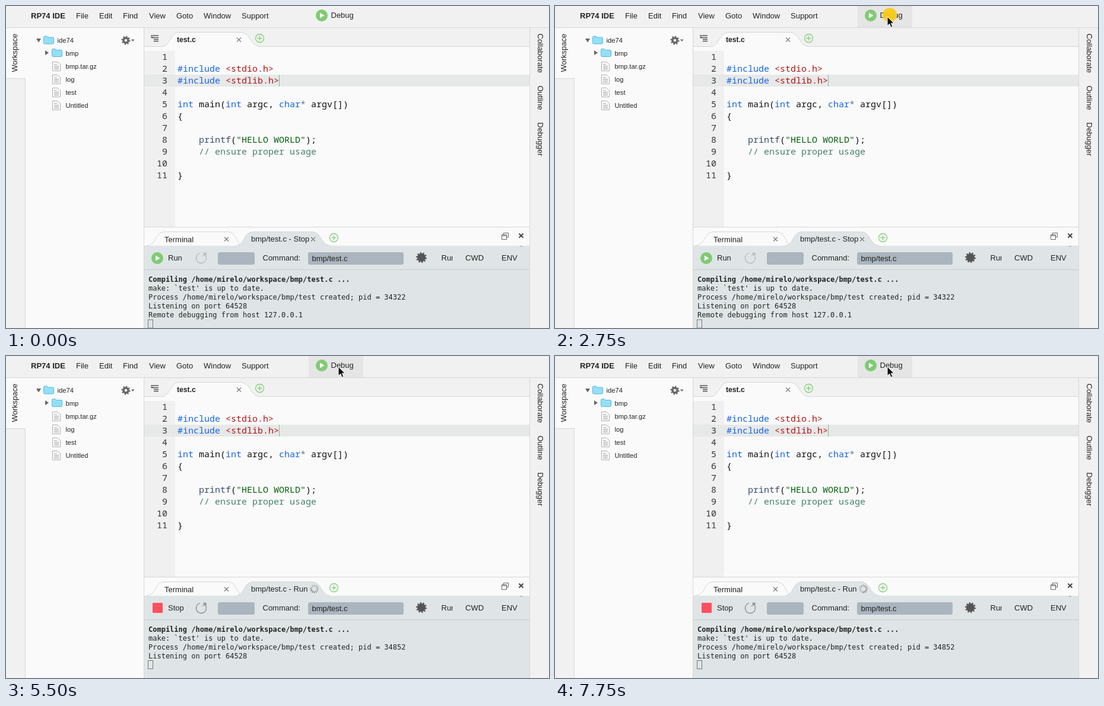
An HTML page that plays this animation: 915x544 px, repeating every 8000 ms.

```html
<!DOCTYPE html>
<html lang="en">
<head>
<meta charset="utf-8">
<title>Editor debug session</title>
<style>
html, body { margin: 0; width: 100%; height: 100%; overflow: hidden; background: #f1f1f1; }
svg { display: block; width: 915px; height: 544px; font: 13px "Liberation Sans", Arial, sans-serif; fill: #222; }
text { white-space: pre; }
.tree { font-size: 11.2px; }
.code { font: 15px "Noto Sans Mono", "DejaVu Sans Mono", monospace; fill: #111; }
.term { font: 12px "DejaVu Sans Mono", monospace; fill: #222; }
.b { font-weight: bold; }
.k { fill: #1565e0; }
.r { fill: #b01515; }
.s { fill: #03600a; }
.f { fill: #3c4c72; }
.c { fill: #45806a; }
.o { fill: #687687; }
.edge { fill: none; stroke: #d6d6d6; }
.field { fill: #abb5bf; }
.x { stroke: #777; stroke-width: 1.1; }
</style>
</head>
<body>
<svg viewBox="0 0 915 544">
  <defs>
    <g id="play"><circle r="10" fill="#80cb74"/><path d="M-3-4.5L4.5 0L-3 4.5Z" fill="#fff"/></g>
    <g id="plus" fill="none" stroke="#82cf78" stroke-width="1.3"><circle r="7"/><path d="M-4 0H4M0-4V4"/></g>
    <path id="close" d="M-3.5-3.5L3.5 3.5M3.5-3.5L-3.5 3.5"/>
    <path id="folder" d="M.5 2.5Q.5.5 2.5.5H6L8 2.5H16Q17.5 2.5 17.5 4V11.5Q17.5 13.5 15.5 13.5H2.5Q.5 13.5.5 11.5Z" fill="#94dff8" stroke="#55b9dc"/>
    <g id="file"><path d="M.5.5H9L13.5 5V15.5H.5Z" fill="#fff" stroke="#aaa"/><path d="M3 4.5H8M3 7.5H11M3 10H11M3 12.5H11" stroke="#999" fill="none"/></g>
    <g id="gear" fill="none" stroke="#666"><circle r="4" stroke-width="3.4"/><circle r="6.3" stroke-width="2.4" pathLength="16" stroke-dasharray="1"/></g>
  </defs>

  <!-- frame and side panels -->
  <rect width="915" height="544" fill="#f1f1f1"/>
  <rect y="37" width="33" height="85" fill="#fafafa"/>
  <rect x="33" y="37" width="199" height="507" fill="#fafafa"/>
  <rect x="233" y="69" width="649" height="336" fill="#fafafa"/>
  <path class="edge" d="M0 36.5H915M0 122.5H32.5V544M232.5 37V544M882.5 37V544M233 68.5H882M233 373.5H882"/>
  <text transform="translate(19 111.500) rotate(-90)">Workspace</text>
  <g id="side"></g>

  <!-- menu -->
  <rect id="hover" x="510" width="92" height="36" fill="#e5e5e5"/>
  <g id="menu"></g>
  <use href="#play" x="532" y="16"/>
  <text x="547.500" y="20">Debug</text>

  <!-- file tree -->
  <path d="M51 55H59L55 61.500ZM66 75V83L72 79Z" fill="#666"/>
  <use href="#folder" x="63" y="50.500"/>
  <use href="#folder" x="77" y="72"/>
  <use href="#gear" x="202" y="58"/>
  <path d="M211 56.500H216.500L213.750 60Z" fill="#666"/>
  <g id="tree" class="tree"></g>

  <!-- editor -->
  <path d="M244 50H257M247 53.500H257M249 56.500H257M249 59.500H257" stroke="#555" stroke-width="1.600"/>
  <path d="M243.500 52L248 52L246 55Z" fill="#555"/>
  <path d="M262 69C278 68 276 44.500 293 44.500H394C414 44.500 410 68 429 69Z" fill="#fafafa"/>
  <path class="edge" d="M262 68.500C278 68 276 44.500 293 44.500H394C414 44.500 410 68 429 68.500"/>
  <text class="b" x="288" y="61" font-size="12.200">test.c</text>
  <use href="#close" class="x" x="392.500" y="57"/>
  <use href="#plus" x="427.500" y="54.500"/>
  <rect x="233" y="76" width="52" height="297" fill="#f0f0f0"/>
  <rect x="233" y="116" width="649" height="20" fill="#e7e8e8"/>
  <g id="code" class="code"></g>
  <rect id="caret" x="460" y="116" width="1" height="20" fill="#8bb593"/>

  <!-- console tabs -->
  <path class="edge" d="M236 405C256 403 249 381.500 268 381.500H372C390 381.500 386 400 398 404"/>
  <path d="M384 405.500C405 404 398 381 418 381H514C534 381 528 404 549 405.500Z" fill="#dfe5e6"/>
  <path class="edge" d="M233 405.500H385C405 404 398 381.500 418 381.500H514C534 381.500 528 404 549 405.500H882"/>
  <text x="267" y="399">Terminal</text>
  <use href="#close" class="x" x="371.500" y="394"/>
  <text id="tab" x="413" y="398"></text>
  <use id="tabClose" href="#close" class="x" x="517.500" y="394"/>
  <g id="spinner" transform="translate(519.500 393.500)" stroke="#555" stroke-width="1.500"></g>
  <use href="#plus" x="552.500" y="391.500"/>
  <path d="M838.500 386.500V383.500H846.500V390.500H843.500M835.500 386.500H843.500V394.500H835.500ZM835.500 388H843" fill="none" stroke="#666"/>
  <use href="#close" x="868" y="388" stroke="#444" stroke-width="2"/>

  <!-- console toolbar -->
  <rect x="233" y="405" width="649" height="139" fill="#dfe5e6"/>
  <path d="M233 445.500H882" stroke="#c6cdcf"/>
  <path d="M866 407L868 405L870 407" fill="none" stroke="#999"/>
  <use id="run" href="#play" x="255" y="426"/>
  <rect id="stop" x="247" y="417" width="17" height="17" rx="1" fill="#ff505e"/>
  <text id="action" x="273" y="430"></text>
  <g id="reload" fill="none" stroke-width="1.300"><path d="M333 418.500A8.500 8.500 0 1 1 327 417.700M331 422.500L337 417.500M332.500 417.500H337V422"/></g>
  <rect class="field" x="357" y="416" width="62" height="21" rx="3"/>
  <text x="432.500" y="430">Command:</text>
  <rect class="field" x="509" y="416" width="161" height="21" rx="3"/>
  <text x="515.500" y="431">bmp/test.c</text>
  <g transform="translate(700 425)" fill="#555"><circle r="7"/><circle r="7.500" fill="none" stroke="#555" stroke-width="3" pathLength="20" stroke-dasharray="1"/></g>
  <svg x="733" y="410" width="19.500" height="30"><text x=".5" y="20">Run</text></svg>
  <text x="774" y="430">CWD</text>
  <text x="835" y="430">ENV</text>

  <!-- console output -->
  <g id="term" class="term"></g>
  <rect id="block" x="239.500" width="8" height="14" fill="none" stroke="#777"/>

  <circle id="click" cx="564" cy="15" r="12" fill="#fccb14"/>
  <path id="mouse" d="M0 0V15.500L3.600 12.200L6.100 18L8.800 16.800L6.400 11.200H11.200Z" fill="#111" stroke="#fff"/>
</svg>
<script>
const $ = id => document.getElementById(id);
const show = (id, on) => $(id).style.display = on ? "" : "none";
const label = (x, y, s, attrs = "") => `<text x="${x}" y="${y}" ${attrs}>${s}</text>`;

const menu = { 42: "RP74 IDE", 118: "File", 157: "Edit", 197: "Find", 241: "View", 287: "Goto", 333: "Window", 397: "Support" };
$("menu").innerHTML = Object.entries(menu).map(([x, s], i) => label(x, 21, s, i ? "" : 'class="b"')).join("");

$("side").innerHTML = [["Collaborate", 46.5], ["Outline", 134.5], ["Debugger", 196.5]]
  .map(([s, y]) => `<text transform="translate(896 ${y}) rotate(90)">${s}</text>`).join("");

$("tree").innerHTML = ["ide74", "bmp", "bmp.tar.gz", "log", "test", "Untitled"].map((s, i) =>
  (i > 1 ? `<use href="#file" x="78" y="${50 + 22 * i}"/>` : "") + label(i ? 100.5 : 86.5, 62 + 22 * i, s)).join("");

const tint = (cls, s) => `<tspan class="${cls}">${s}</tspan>`;
const include = s => tint("k", "#include ") + tint("r", `&lt;${s}&gt;`);
const code = ["", include("stdio.h"), include("stdlib.h"), "",
  `${tint("k", "int")} main(${tint("k", "int")} argc, ${tint("k", "char")}${tint("o", "*")} argv[])`,
  "{", "",
  `    ${tint("f", "printf")}(${tint("s", '"HELLO WORLD"')});`,
  `    ${tint("c", "// ensure proper usage")}`,
  "", "}"];
$("code").innerHTML = code.map((s, i) =>
  label(272, 91 + 20 * i, i + 1, 'text-anchor="end" fill="#333"') + label(289, 91 + 20 * i, s)).join("");

const spokes = 12;
$("spinner").innerHTML = Array.from({ length: spokes }, (_, i) =>
  `<path d="M0-4V-7.300" transform="rotate(${i * 360 / spokes})"/>`).join("");

const output = pid => ["Compiling /home/mirelo/workspace/bmp/test.c ...", "make: `test' is up to date.",
  `Process /home/mirelo/workspace/bmp/test created; pid = ${pid}`, "Listening on port 64528",
  "Remote debugging from host 127.0.0.1"];

// pointer tip at each tick; it rests on the last point
const path = [null, [570, 1], [577, 41], [667, 153], [640, 182], [582, 188], [582, 188],
  [561, 79], [561, 55], [560, 30], [560, 18]];
const TICK = 250, LOOP = 8000;
let last = -1;

function draw(n) {
  const tip = path[Math.min(n, path.length - 1)];
  const running = n >= 13;
  show("mouse", tip);
  if (tip) $("mouse").setAttribute("transform", `translate(${tip})`);
  show("hover", tip && tip[1] < 36);
  show("click", n === 11 || n === 12);
  $("click").setAttribute("opacity", n === 11 ? 0.93 : 0.45);
  show("caret", !(n === 1 || n === 2 || n === 7 || n === 8));

  for (const id of ["run", "tabClose"]) show(id, !running);
  for (const id of ["stop", "spinner"]) show(id, running);
  $("tab").textContent = "bmp/test.c - " + (running ? "Run" : "Stop");
  $("action").textContent = running ? "Stop" : "Run";
  $("reload").setAttribute("stroke", running ? "#899194" : "#b5bcbe");
  [...$("spinner").children].forEach((p, i) =>
    p.setAttribute("opacity", 0.3 + 0.5 * ((i - n + 48) % spokes) / spokes));

  const lines = running ? output(34852).slice(0, [0, 1, 2, 4][Math.min(n - 13, 3)]) : output(34322);
  $("term").innerHTML = lines.map((s, i) => label(240, 466 + 15 * i, s, i ? "" : 'class="b"')).join("");
  $("block").setAttribute("y", 454.5 + 15 * lines.length + (lines.length < 5 ? 0 : 0.5));
}

function frame() {
  const n = Math.floor(performance.now() % LOOP / TICK);
  if (n !== last) draw(last = n);
  requestAnimationFrame(frame);
}
frame();
</script>
</body>
</html>
```
